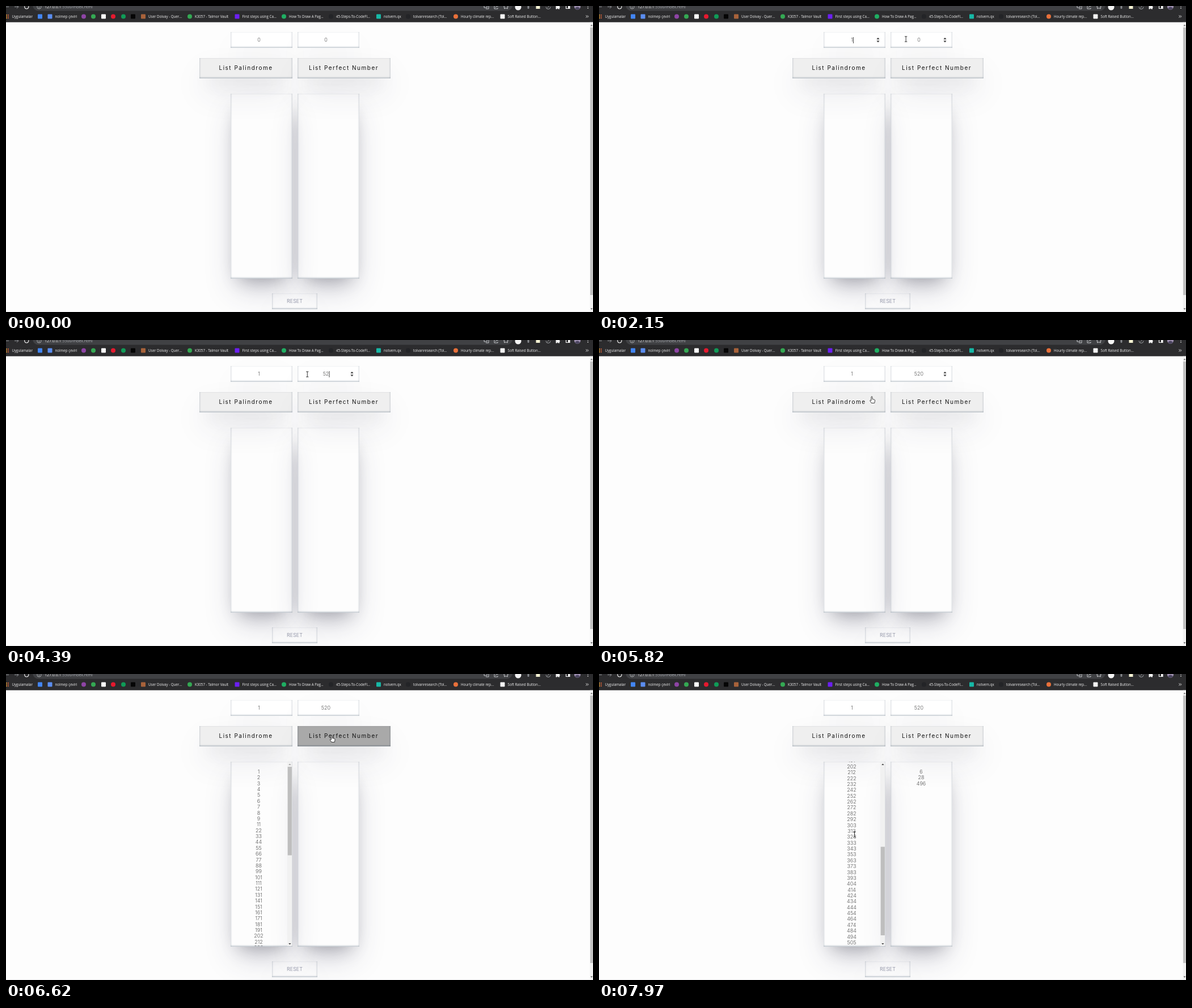
An HTML page that plays this animation: 1035x541 px, repeating every 8000 ms.

```html
<!DOCTYPE html>
<html lang="en">
<head>
<meta charset="utf-8">
<title>Number lists</title>
<style>
html, body { margin: 0; width: 100%; height: 100%; overflow: hidden; background: #fdfdfd; }
#stage { position: absolute; left: 0; top: 0; width: 1035px; height: 541px; overflow: hidden; }
#stage div {
  position: absolute;
  box-shadow: 0 27px 54px -11px rgba(50,50,93,.25), 0 16px 32px -16px rgba(0,0,0,.3),
    inset 0 -1px 3px rgba(10,37,64,.35);
}
#stage .input { background: #fff; }
#stage .button { background: #efefef; }
#stage .button.hot { background: #a9a9a9; }
svg { position: absolute; left: 0; top: 0; }
text { white-space: pre; }
.page { font: 300 9px Inter, Roboto, sans-serif; fill: #555; text-anchor: middle; }
.label { font: 400 10px Inter, Roboto, sans-serif; letter-spacing: 1.5px; fill: #111; text-anchor: middle; }
.mark { font: 6.2px "Open Sans", "Noto Sans", sans-serif; fill: #f1f1f1; }
.url { font: 7px "Open Sans", "Noto Sans", sans-serif; fill: #f1f1f1; }
</style>
</head>
<body>
<div id="stage"></div>
<script>
const stage = document.getElementById('stage');
const LOOP = 8000, ROW = 10.37, SCROLL = 299.5;

function box(cls, x, y, w, h) {
  const d = document.createElement('div');
  d.className = cls;
  d.style.cssText = `left:${x}px;top:${y}px;width:${w}px;height:${h}px`;
  stage.append(d);
  return { d, x, y, w, h };
}
const has = (b, p) => p && p.x >= b.x && p.x <= b.x + b.w && p.y >= b.y && p.y <= b.y + b.h;

const inputs = [396, 514].map(x => box('input', x, 46, 109, 28));
const buttons = [341, 514].map(x => box('button', x, 92, 164, 36));
const panels = [396, 514].map(x => box('panel', x, 154.5, 109, 327.5));
box('reset', 469, 508, 80, 28);

function el(name, attrs, parent, content) {
  const e = document.createElementNS('http://www.w3.org/2000/svg', name);
  for (const k in attrs) e.setAttribute(k, attrs[k]);
  if (content !== undefined) e.textContent = content;
  parent.append(e);
  return e;
}
const svg = el('svg', { width: 1035, height: 541, viewBox: '0 0 1035 541' }, stage);
const rect = (x, y, width, height, fill, parent = svg, rx = 0) =>
  el('rect', { x, y, width, height, fill, rx }, parent);
const dot = (cx, cy, r, fill) => el('circle', { cx, cy, r, fill }, svg);
const path = (d, fill, stroke = 'none', w = 1, parent = svg) =>
  el('path', { d, fill, stroke, 'stroke-width': w }, parent);
const line = (d, stroke = '#c4c7ca', w = 1) => path(d, 'none', stroke, w);
const text = (cls, x, y, s, parent = svg) => el('text', { class: cls, x, y }, parent, s);
const show = (e, on) => e.setAttribute('visibility', on ? 'visible' : 'hidden');

function drawToolbar() {
  rect(0, 0, 1035, 28.7, '#2c2c2e');
  rect(47, -12, 846, 20.5, '#404144', svg, 10);
  line('M0 1.5H5M15 1.5H22M19 4.5L22 1.5L19 -1', '#8a8d91');
  line('M39.6 0A3.6 3.6 0 1 1 33 0', '#f1f1f1', 1.1);
  line('M62 1.5A3.6 3.6 0 1 1 54.8 1.5A3.6 3.6 0 0 1 62 1.5M58.4 1V3.8', '#c4c7ca', .8);
  const url = text('url', 68, 4.3, '127.0.0.1');
  el('tspan', { fill: '#a9adb2' }, url, ':5500/index.html');

  line('M843 -1H848V3H843ZM846 5H851V0');
  line('M861 0V5H867V3M863 3Q864 0 868 0');
  line('M878 0L879 5L881.5 3.4L884 5L885 0', '#d5d7d9');
  dot(903, 2, 5.5, '#f4f4f4');
  rect(919.5, -1, 3, 6, '#85888c', svg, 1.5);
  rect(934.5, -2, 7, 7, '#f3f1d2');
  line('M960 1.5A4 4 0 1 1 952 1.5M954.5 3.5L957.5 0', '#a9acb0', .9);
  path('M969.5 -1H976V1Q978 2 976 3.2V5.5H973.6Q972.8 3 971.6 5.5H969.5Z', '#f1f1f1');
  line('M987.5 -1V4.5H994V-1', '#f1f1f1', 1.2);
  rect(991, -1, 3, 5.5, '#f1f1f1');
  dot(1007.5, 1, 5.6, '#9d8fae');
  path('M1003 4.3Q1007.5 -1.5 1012 4.3Q1007.5 8.5 1003 4.3', '#4b4560');
  dot(1026, 0, .9, '#f1f1f1');
  dot(1026, 3.6, .9, '#f1f1f1');

  for (const y of [16, 18.6, 21.2]) {
    dot(1, y, .95, '#f0a030');
    dot(4, y, .95, '#e8663c');
  }
  const marks = [
    ['', 60, '#4285f4', 1], ['nolmep çeviri', 77.5, '#5b8def', 1], ['', 137, '#8e44a5', 0],
    ['', 154, '#34a853', 0], ['', 172, '#ffffff', 1], ['', 189, '#e5192f', 0],
    ['', 207, '#0f9b57', 0], ['', 224, '#050505', 1],
    ['User Dolvay - Quer...', 242, '#a8623a', 1], ['K3057 - Talmor Vault', 324, '#34a853', 0],
    ['First steps using Ca...', 407.5, '#6c1ff2', 1], ['How To Draw A Pag...', 490, '#1fae62', 0],
    ['45-Steps-To-CodeFl...', 573, '#232427', 0], ['notvem.qx', 657, '#17b8a6', 1],
    ['tolvanresearch (Tol...', 709, '#232427', 0], ['Hourly climate rep...', 793, '#e8703a', 0],
    ['Soft Raised Button...', 875.5, '#f4f4f4', 1]
  ];
  text('mark', 10.5, 20.8, 'Uygulamalar');
  for (const [name, x, color, square] of marks) {
    if (square) rect(x - 4, 14.5, 8, 8, color, svg, 1);
    else dot(x, 18.5, 4, color);
    if (name) text('mark', x + 9, 20.8, name);
  }
  line('M1022.5 16.5L1024.3 18.5L1022.5 20.5M1025 16.5L1026.8 18.5L1025 20.5', '#f1f1f1', .9);
}

function drawPage() {
  rect(1029.5, 28.7, 5.5, 512.3, '#f1f1f1');
  rect(1030, 38, 5, 473, '#c1c1c1');
  path('M1030.5 35.3H1034.5L1032.5 33Z', '#666');
  path('M1030.5 534.5H1034.5L1032.5 536.8Z', '#555');
  rect(0, 540, 1029.5, 1, '#ececee');
  text('label', 423, 113.4, 'List Palindrome');
  text('label', 595.5, 113.4, 'List Perfect Number');
  text('page', 509, 525.3, 'RESET').style.fill = '#7d8096';
}

drawToolbar();
drawPage();

// Number fields
const fields = [446, 564].map(x => {
  const mark = rect(x - 3.5, 54.5, 7, 11.5, '#3390ff');
  const value = text('page', x, 63.3, '0');
  const caret = rect(0, 55, .9, 11, '#333');
  const spin = path(`M${x + 43.4} 58.9h5.2l-2.6 -3.1ZM${x + 43.4} 61.3h5.2l-2.6 3.1Z`, '#444');
  return { x, mark, value, caret, spin };
});

// Result lists
const clip = el('clipPath', { id: 'view' }, svg);
rect(396, 155, 227, 326, '#000', clip);
const view = el('g', { 'clip-path': 'url(#view)' }, svg);
const span = Array.from({ length: 520 }, (_, i) => i + 1);
const isPalindrome = n => String(n) === [...String(n)].reverse().join('');
const isPerfect = n => n > 1 && span.filter(d => d < n && n % d === 0).reduce((a, b) => a + b, 0) === n;
function list(x, numbers) {
  const g = el('g', {}, view);
  numbers.forEach((n, i) => text('page', x, 176 + i * ROW, n, g));
  return g;
}
const palindromes = list(445.5, span.filter(isPalindrome));
const perfects = list(568, span.filter(isPerfect));

const bar = el('g', {}, svg);
rect(496, 156, 8.3, 325, '#f1f1f1', bar);
const thumb = rect(496.7, 164, 7.2, 156.5, '#bebebe', bar);
const up = path('M498.2 161h4.4l-2.2 -2.5Z', '#444', 'none', 0, bar);
path('M498.2 476h4.4l-2.2 2.5Z', '#444', 'none', 0, bar);

// Pointer shapes
const pointers = {
  arrow: path('M0 0V9.2L2.1 7.3L3.6 10.7L5 10.1L3.6 6.8H6.4Z', '#fff', '#111', .75),
  beam: line('M-2.2 -4.6H2.2M0 -4.6V4.6M-2.2 4.6H2.2', '#222', .9),
  hand: path('M-1 1Q0 -.6 1 1V5L4.6 5.8Q5.8 6.2 5.6 7.6L4.8 12H-.6Q-1.8 9.6 -3.4 7.6Q-3 6 -1 7.6Z',
    '#fff', '#111', .8)
};
const route = [
  [130, 914, 473], [440, 640, 232], [700, 470, 95], [810, 456.5, 76.5], [880, 457, 72.5],
  [950, 462, 66], [1200, 500, 57], [1400, 500, 57], [1660, 493, 56], [1930, 493, 56],
  [2150, 541, 58.5], [2330, 574, 59.5], [2470, 574, 59.5], [2810, 531.3, 60.6],
  [5750, 531.3, 60.6], [5820, 481, 99.5], [5940, 478, 103], [6410, 478, 103],
  [6620, 574.5, 108.5], [6870, 580, 104], [6990, 580, 104], [7010, 581, 102],
  [7210, 581, 102], [7380, 510, 196], [7530, 451, 278], [7970, 450.5, 283.5]
];
function pointerAt(t) {
  if (t < route[0][0]) return null;
  let i = 1;
  while (i < route.length - 1 && route[i][0] < t) i++;
  const [t0, x0, y0] = route[i - 1], [t1, x1, y1] = route[i];
  const k = Math.min(1, (t - t0) / (t1 - t0));
  return { x: x0 + (x1 - x0) * k, y: y0 + (y1 - y0) * k };
}
function shapeFor(p) {
  if (buttons.some(b => has(b, p))) return 'hand';
  const field = inputs.find(b => has(b, p));
  if (field) return p.x > field.x + 88 ? 'arrow' : 'beam';
  return panels.some(b => has(b, p)) ? 'beam' : 'arrow';
}

const blink = age => age % 1060 < 530;
function setField(i, value, focused, caret, p) {
  const f = fields[i];
  if (f.value.textContent !== value) f.value.textContent = value;
  show(f.spin, focused || has(inputs[i], p));
  show(f.caret, caret);
  if (caret) f.caret.setAttribute('x', f.x + f.value.getComputedTextLength() / 2 + .2);
}

function draw(t) {
  const p = pointerAt(t);
  const shape = p && shapeFor(p);
  for (const name in pointers) {
    show(pointers[name], name === shape);
    if (p) pointers[name].setAttribute('transform', `translate(${p.x} ${p.y})`);
  }
  const late = pointerAt(t - 60);
  buttons.forEach(b => b.d.classList.toggle('hot', !!has(b, late)));

  const first = t >= 1930 && t < 2470;
  setField(0, t < 1930 ? '0' : '1', first, first && blink(t - 1930), p);

  const typed = [[3540, '5'], [4390, '52'], [5060, '520']].filter(k => k[0] <= t).pop();
  const second = t >= 2470 && t < 6080;
  setField(1, typed ? typed[1] : '0', second, !!typed && second && blink(t - typed[0]), p);
  const selected = t >= 2650 && t < 3540;
  show(fields[0].mark, false);
  show(fields[1].mark, selected);
  fields[1].value.style.fill = selected ? '#fff' : '';

  const k = Math.max(0, Math.min(1, (t - 7500) / 470));
  show(palindromes, t >= 6080);
  show(bar, t >= 6080);
  show(perfects, t >= 7010);
  palindromes.setAttribute('transform', `translate(0 ${-SCROLL * k})`);
  thumb.setAttribute('y', 164 + 141.5 * k);
  up.setAttribute('fill', k > 0 ? '#444' : '#a3a3a3');
}

const start = performance.now();
function tick() {
  draw((performance.now() - start) % LOOP);
  requestAnimationFrame(tick);
}
tick();
</script>
</body>
</html>
```
